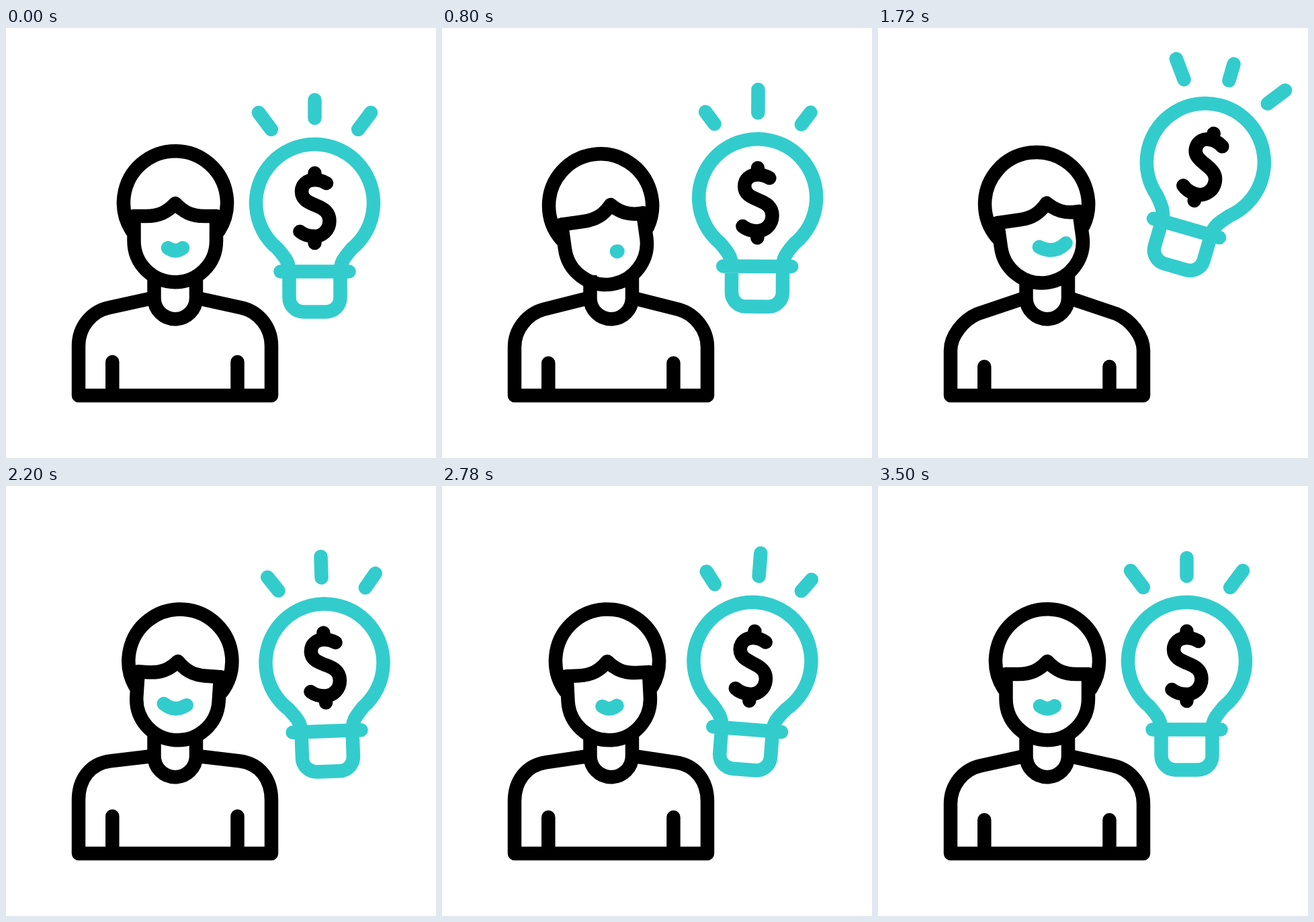
An HTML page that plays this animation: 640 px wide and 640 px high, repeating every 3600 ms.

```html
<!DOCTYPE html>
<html lang="en">
<head>
<meta charset="utf-8">
<title>Bright idea</title>
<style>
  html, body { margin: 0; width: 100%; height: 100%; overflow: hidden; background: #fff; }
  svg { display: block; width: 100vw; height: 100vh; }
  path { fill: none; stroke: #000; stroke-width: 20.5; stroke-linecap: round; stroke-linejoin: round; }
  .teal { stroke: #33cccc; }
</style>
</head>
<body>
<svg viewBox="0 0 640 640">
  <path id="body"/>
  <path d="M220.5 368V402A31.2 31.2 0 0 0 283 402V368" style="stroke-linecap:butt"/>
  <g id="head">
    <path d="M187.3 302A77 77 0 1 1 316.7 302"/>
    <path d="M190.5 280V317A61.25 61.25 0 0 0 313 317V280"/>
    <path id="fringe"/>
    <path id="mouth" class="teal"/>
  </g>
  <!-- bulb is drawn around the centre of its glass -->
  <g id="bulb">
    <path class="teal" d="M-38.5 97C-39.5 86 -46 79 -55.5 67.6A87.5 87.5 0 1 1 55.5 67.6C46 79 39.5 86 38.5 97"/>
    <path class="teal" d="M-51 102H51M-38 102V141A21 21 0 0 0 -17 162H17A21 21 0 0 0 38 141V102"/>
    <path class="teal" id="rays"/>
    <path id="dollar" d="M17.5 -37C11 -41 5 -42 0 -42C-12 -42 -19.5 -34.5 -19.5 -24.5C-19.5 -12.5 -9 -8.5 1.5 -4C14 1 22 6.5 22 19C22 33 11 42 0 42C-9 42 -16 40 -22 35M0 -52V-42M0 42V52"/>
  </g>
</svg>
<script>
const LOOP = 3600;
// Beats of the story: the bulb dips, jumps, hovers, lands, sways and rests.
const DIP = 500, JUMP = 1180, HOVER = 1720, LAND = 2200, SWAY = 2780, REST = 3500;

// Offsets from the resting pose, eased from beat to beat.
const moves = {
  bulbX:  [[0, 0], [JUMP, 13.5], [1800, 28.5], [LAND, 14.5], [SWAY, 2.5], [REST, 0]],
  bulbY:  [[0, 0], [DIP, 24.5], [JUMP, -53.5], [1640, -64.5], [LAND, 2.5], [SWAY, 0]],
  lean:   [[0, 0], [DIP, -8.4], [JUMP, 12.6], [HOVER, 16.1], [LAND, -2], [SWAY, 4.4], [REST, 0]],
  shrink: [[860, 0], [JUMP, .13], [DIP + 1000, 0]],
  flare:  [[0, 0], [650, -.28], [1000, -.28], [HOVER, .05], [2500, -.28], [2740, -.28], [3260, 0]],
  tilt:   [[0, 0], [750, -8], [HOVER, -8], [LAND, 3.7], [SWAY, -3], [REST, 0]],
  turn:   [[0, 0], [770, 15], [HOVER, 15], [LAND, -3.5], [SWAY, 0]],
  drop:   [[0, 0], [DIP, 3.5], [HOVER, .6]  , [LAND, 0]],
  smile:  [[0, 0], [DIP, -10], [JUMP, -10.5], [HOVER, 9], [LAND, 6], [SWAY, 0]],
  breath: [[DIP, 0], [1400, 7], [HOVER, 7], [LAND, -5.5], [SWAY, -4], [REST, 0]]
};

function glide(keys, t) {
  const i = keys.findIndex(k => k[0] > t);
  if (i < 0) return keys[keys.length - 1][1];
  if (i === 0) return keys[0][1];
  const [t0, a] = keys[i - 1], [t1, b] = keys[i];
  const u = (t - t0) / (t1 - t0);
  return a + (b - a) * u * u * (3 - 2 * u);
}

function bodyPath(b) {
  const x = 152 - .6 * b, y = 416.5 + 1.3 * b;
  const hx = x - 26 + .8 * b, hy = y + 6 + .4 * b;
  const side = 473 + b, bend = side - 27 + .7 * b;
  const flip = v => 503 - v;
  return `M218 402L${x} ${y}C${hx} ${hy} 108 ${bend} 108 ${side}V547H395V${side}` +
    `C395 ${bend} ${flip(hx)} ${hy} ${flip(x)} ${y}L285 402` +
    `M158.3 547V${497 + b}M344.5 547V${497 + b}`;
}

function fringePath(turn) {
  const x = 252 + turn;
  return `M190.5 280H${x - 43}C${x - 24} 280 ${x - 12} 274 ${x} 261` +
    `C${x + 12} 274 ${x + 24} 280 ${x + 43} 280H313`;
}

// The wider the mouth, the more its corners rise.
function mouthPath(turn, half) {
  const x = 252 + turn, rise = .36 * half, y = 331.3 - rise;
  return `M${x - half} ${y}Q${x} ${y + 2 * rise} ${x + half} ${y}`;
}

// The middle ray grows while the outer two shorten.
function rayPath(flare) {
  const dx = 18.8 * (1 + flare), dy = 25 * (1 + flare);
  return `M-64.7 -109.5l${-dx} ${-dy}M0 -126.5v${-27 * (1 - flare)}M64.7 -109.5l${dx} ${-dy}`;
}

function set(id, attrs) {
  const el = document.getElementById(id);
  for (const name in attrs) el.setAttribute(name, attrs[name]);
}

function draw(t) {
  const p = {};
  for (const name in moves) p[name] = glide(moves[name], t);
  const size = 1 - p.shrink;

  set('bulb', { transform: `translate(${459.5 + p.bulbX} ${260.5 + p.bulbY}) rotate(${p.lean})` });
  set('rays', { d: rayPath(p.flare) });
  set('dollar', { transform: `translate(0 7.5) scale(${size})`, style: `stroke-width:${20.5 / size}` });
  set('head', { transform: `translate(0 ${p.drop}) rotate(${p.tilt} 252 375)` });
  set('fringe', { d: fringePath(p.turn) });
  set('mouth', { d: mouthPath(p.turn, 11 + p.smile) });
  set('body', { d: bodyPath(p.breath) });
}

const start = performance.now();
function tick() {
  draw((performance.now() - start) % LOOP);
  requestAnimationFrame(tick);
}
tick();
</script>
</body>
</html>
```
